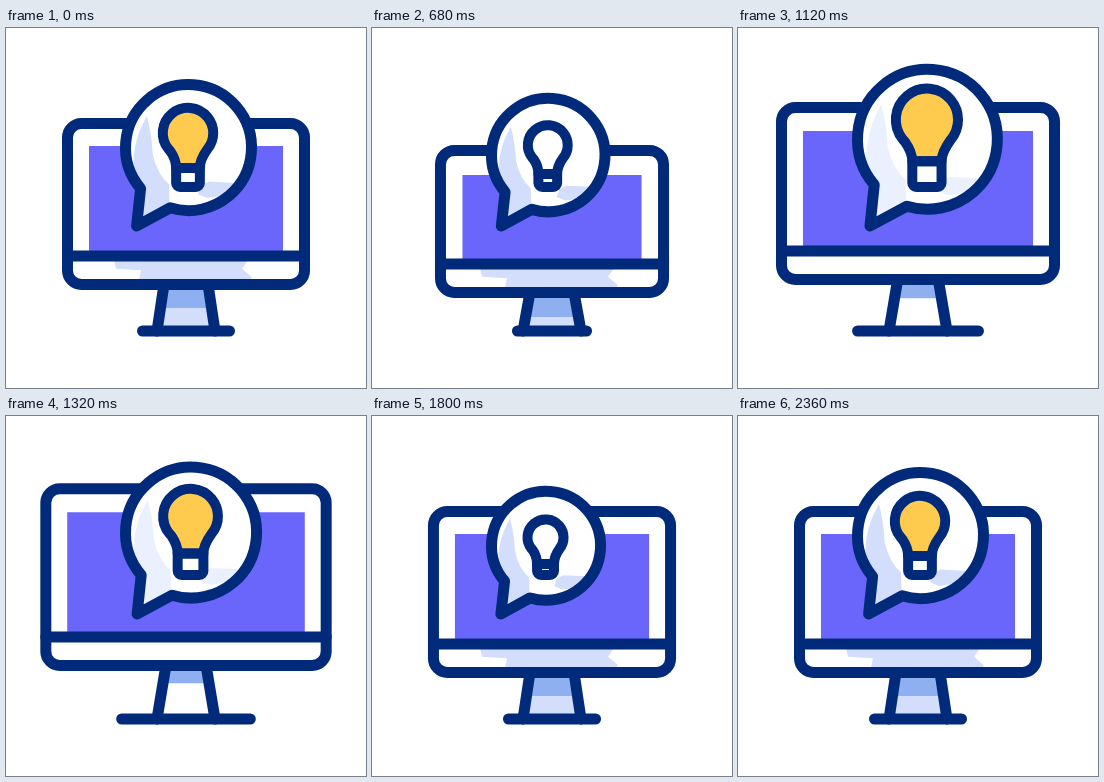
Write an HTML page with a canvas that moves like this. It is 360 px wide and 360 px high and loops after 3000 ms.

```html
<!DOCTYPE html>
<html lang="en">
<head>
<meta charset="utf-8">
<title>Bright idea</title>
<style>
  html, body { margin: 0; width: 100%; height: 100%; overflow: hidden; background: #fff; }
  canvas { display: block; width: 360px; height: 360px; }
</style>
</head>
<body>
<canvas id="stage" width="360" height="360"></canvas>
<script>
const ctx = document.getElementById('stage').getContext('2d');
const LOOP = 3000, STEP = 40, MID = 180, FLOOR = 303;
const NAVY = '#012b7a', PURPLE = '#6a65fb', YELLOW = '#ffcb4f',
      PALE = '#d2defc', BLUE = '#8fb0f0', WHITE = '#fff';

// half width, top, bottom, divider, screen half width, screen top,
// foot half width, stand top half width, lower edge of the stand shadow
const REST = [124, 90, 262, 228, 97, 118, 49, 22, 280];
const SMALL = [117, 117, 270, 236, 89.5, 147, 40, 22, 289];
const LARGE = [146.3, 66.6, 254.8, 220.8, 119.4, 95.5, 70.4, 20, 267];

// tracks: [time, values]
const MONITOR = [[200, REST], [700, SMALL], [1260, LARGE], [1820, REST]];
const BUBBLE = [[200, [68.5]], [460, [58.3]], [1150, [75.5]], [1640, [58.9]], [2360, [68.5]]];
const GLOW = [[310, [1]], [430, [0]], [760, [0]], [900, [1]], [1320, [1]], [1440, [0]], [1860, [0]], [2000, [1]]];
const SHADE = [[780, [1]], [1000, [0]], [1460, [0]], [1740, [1]]];

function at(track, t) {
  if (t <= track[0][0]) return track[0][1];
  for (let i = 1; i < track.length; i++) {
    const [t0, a] = track[i - 1], [t1, b] = track[i];
    if (t < t1) {
      const k = (1 - Math.cos(Math.PI * (t - t0) / (t1 - t0))) / 2;
      return a.map((v, j) => v + (b[j] - v) * k);
    }
  }
  return track[track.length - 1][1];
}

function fill(path, color, alpha = 1) {
  ctx.globalAlpha = alpha;
  ctx.fillStyle = color;
  ctx.fill(path);
  ctx.globalAlpha = 1;
}

function line(path, width = 11) {
  ctx.lineWidth = width;
  ctx.stroke(path);
}

function poly(points, closed = true) {
  const path = new Path2D();
  points.forEach(([x, y]) => path.lineTo(x, y));
  if (closed) path.closePath();
  return path;
}

function box(x, y, w, h, r = 0) {
  const path = new Path2D();
  path.roundRect(x, y, w, h, r);
  return path;
}

function within(path, draw) {
  ctx.save();
  ctx.clip(path);
  draw();
  ctx.restore();
}

function drawMonitor(pose, shade) {
  const [half, top, bottom, split, screen, screenTop, foot, neck, shadow] = pose;
  const base = bottom - 5.5;

  const legs = [[MID - 29, FLOOR], [MID - neck, base], [MID + neck, base], [MID + 29, FLOOR]];
  const stand = poly(legs);
  fill(stand, WHITE);
  within(stand, () => {
    fill(box(140, shadow, 80, FLOOR - shadow), PALE, shade);
    fill(box(140, base, 80, shadow - base), BLUE);
  });
  line(poly(legs, false));
  line(poly([[MID - foot + 5.5, FLOOR], [MID + foot - 5.5, FLOOR]], false));

  const body = box(MID - half + 5.5, top + 5.5, 2 * half - 11, bottom - top - 11, 14);
  fill(body, WHITE);
  fill(box(MID - screen, screenTop, 2 * screen, split - screenTop), PURPLE);
  const h = base - split;
  const panel = [[-73, 0], [65, 0], [56, .45], [66, .75], [60, 1], [-48, 1], [-45, .5], [-70, .45]];
  fill(poly(panel.map(([x, y]) => [MID + x, split + y * h])), PALE, shade);
  line(poly([[MID - half + 5.5, split], [MID + half - 5.5, split]], false));
  line(body);
}

function drawBulb(cx, r, glow) {
  const cy = 121.5 - 1.93 * (r - 60);
  const head = 18 + .85 * (r - 60);
  const w = head * .47;
  const foot = 159, top = foot - 12 - 1.13 * (head - 19);
  const a = Math.PI * .28;
  const bend = cy + head * 1.05;

  const glass = new Path2D();
  glass.moveTo(cx - w, top);
  glass.quadraticCurveTo(cx - w, bend, cx - head * Math.sin(a - .1), cy + head * Math.cos(a - .1));
  glass.arc(cx, cy, head, Math.PI / 2 + a, Math.PI / 2 - a);
  glass.quadraticCurveTo(cx + w, bend, cx + w, top);
  glass.closePath();
  fill(glass, WHITE);
  fill(glass, YELLOW, glow);
  const socket = box(cx - w, top, 2 * w, foot - top, [0, 0, 4, 4]);
  fill(socket, WHITE);
  line(glass, 10);
  line(socket, 10);
}

function drawBubble(r, glow, shade) {
  const R = r - 5.5;
  const cx = 114 + r;
  const cy = 189 - .2 * (r - 64) - r;
  const tip = [130.5 + .2 * (r - 68), 198];
  const rel = ([x, y]) => [cx + x * R, cy + y * R];
  const rad = Math.PI / 180;

  const bubble = new Path2D();
  bubble.moveTo(...tip);
  bubble.arc(cx, cy, R, 139.5 * rad, 467 * rad);
  bubble.closePath();
  fill(bubble, WHITE);

  const alpha = .45 + .55 * shade;
  within(bubble, () => {
    const left = new Path2D();
    left.moveTo(...rel([-.66, -.5]));
    left.quadraticCurveTo(...rel([-.58, -.2]), ...rel([-.57, .1]));
    left.quadraticCurveTo(...rel([-.5, .42]), ...rel([-.31, .58]));
    left.lineTo(...rel([-.3, .97]));
    left.lineTo(...tip);
    left.lineTo(...rel([-.85, .55]));
    left.quadraticCurveTo(...rel([-.95, 0]), ...rel([-.66, -.5]));
    fill(left, PALE, alpha);
    fill(poly([[.2, .6], [.32, .54], [.75, .56], [.58, .76], [.3, .8], [.15, .74]].map(rel)), PALE, alpha);
  });
  line(bubble);
  drawBulb(cx - .5, r, glow);
}

function frame(now) {
  const t = Math.floor(now % LOOP / STEP) * STEP;
  const [shade] = at(SHADE, t);
  ctx.fillStyle = WHITE;
  ctx.fillRect(0, 0, 360, 360);
  ctx.strokeStyle = NAVY;
  ctx.lineCap = ctx.lineJoin = 'round';
  drawMonitor(at(MONITOR, t), shade);
  drawBubble(at(BUBBLE, t)[0], at(GLOW, t)[0], shade);
}

const start = performance.now();
function tick() {
  frame(performance.now() - start);
  requestAnimationFrame(tick);
}
tick();
</script>
</body>
</html>
```
